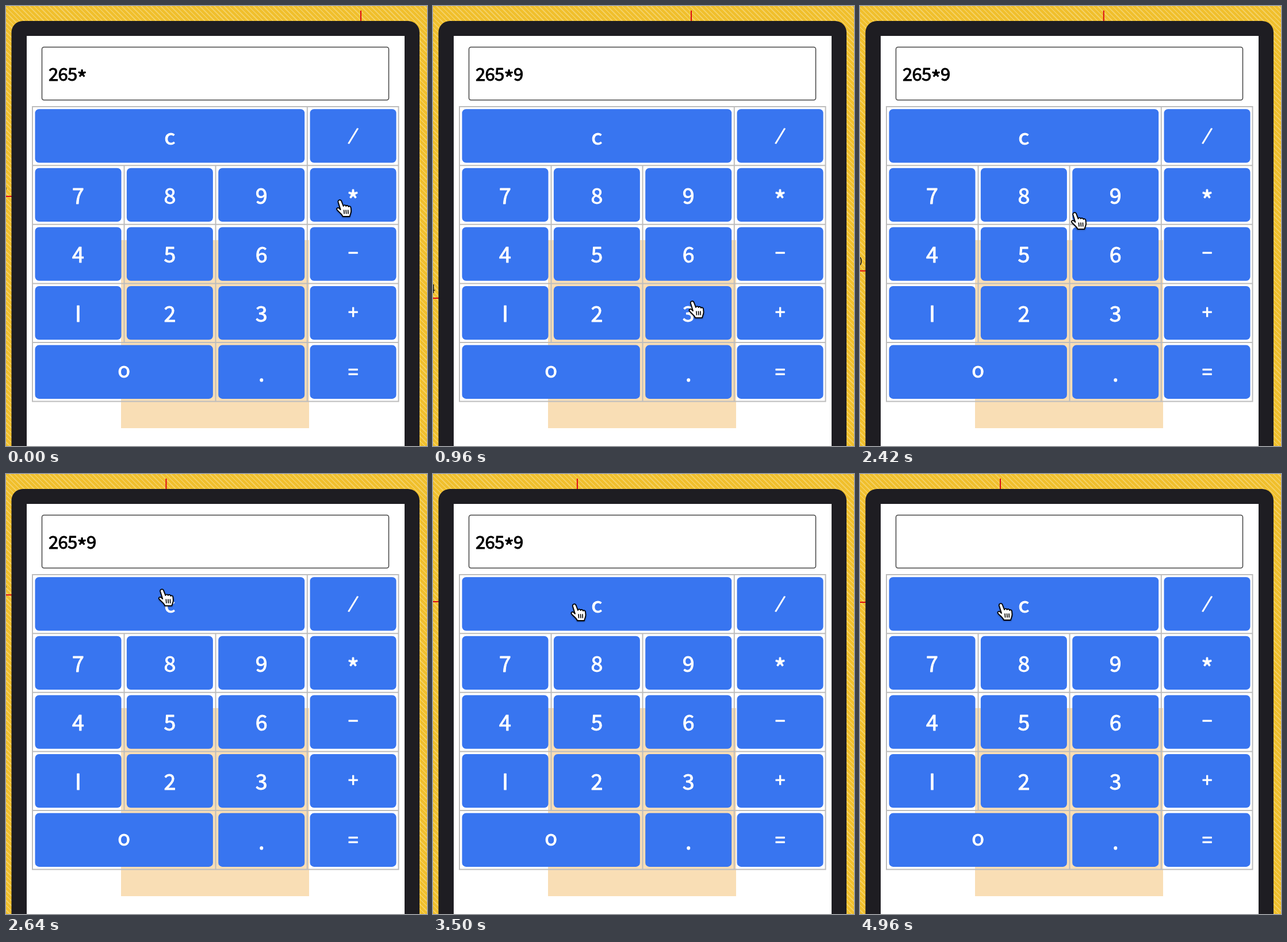
An HTML page that plays this animation: 732 px wide and 765 px high, repeating every 4980 ms.

```html
<!DOCTYPE html>
<html lang="en">
<meta charset="utf-8">
<title>Calculator</title>
<style>
  html, body { margin: 0; width: 100%; height: 100%; overflow: hidden; }
  body { background: repeating-linear-gradient(45deg, #f0bf2c 0 4.2px, #f4d062 4.2px 6px); }
  svg { display: block; }
  text {
    font-family: "Noto Sans CJK JP", "Noto Sans CJK SC", "Noto Sans", sans-serif;
    text-anchor: middle; stroke-linejoin: round;
  }
  #keys text { fill: #fff; stroke: #fff; }
  #keys rect { fill: #3875f0; }
  #display text { stroke: #000; }
</style>
<svg width="732" height="765" viewBox="0 0 732 765">
  <path id="guides" stroke="#dc0a14" stroke-width="2"/>
  <text id="label" x="-12.5" font-size="20" fill="#222"></text>
  <rect x="9.5" y="26" width="709.5" height="800" rx="20" fill="#1e1d22"/>
  <rect x="36" y="52" width="657" height="713" fill="#fff"/>
  <rect x="200" y="407" width="327" height="327" fill="#f9deb5"/>
  <rect x="62.5" y="71.5" width="603" height="92" rx="3.5" fill="#fff" stroke="#444" stroke-width="1.5"/>
  <g id="display"></g>
  <path fill="none" stroke="#bdbdbd" stroke-width="2"
    d="M46 175H682.5V687.5H46ZM46 277.3H682M46 379.8H682M46 482.4H682M46 585H682M205.5 277V585M364.5 277V687M523.8 175V687"/>
  <g id="keys"></g>
  <g id="hand" stroke-linejoin="round" stroke-linecap="round" style="filter: drop-shadow(0 1px 1px #0006)">
    <path fill="#fff" stroke="#000" stroke-width="1.8"
      d="M4 5C3 1 8 0 9.5 3L13 12C13.5 9.5 17 9.5 17.5 12C18.5 10 21.5 10.5 22 13C23 11.5 26 12 26 15L26.5 20C26.5 24 25 25 24 30H12C11 26 6 23 2.5 19C0 16 3 13.5 6 16L8 18Z"/>
    <path fill="none" stroke="#000" stroke-width="1.6" d="M14 19L14.5 25M17.5 19L18 25M21 19L21.3 25"/>
  </g>
</svg>
<script>
const $ = id => document.getElementById(id);
const LOOP = 4980, LAG = 80, NINE_AT = 460, CLEAR_AT = 3800;

// Font size and baseline (from the key's top edge) of signs unlike the digits
const SIGNS = {
  "/": [30, 56], "*": [46, 74], "−": [32, 57], "+": [32, 57],
  "=": [32, 58], "o": [36, 56], ".": [38, 63]
};

const glyph = (char, x, y, size, tilt = 0) =>
  `<text x="${x}" y="${y}" font-size="${size}" transform="rotate(${tilt} ${x} ${y - 9})">${char}</text>`;

function key(char, col, row, span = 1) {
  const x = 50.5 + 159.35 * col, y = 179.2 + 102.6 * row;
  const width = 150 + 159.35 * (span - 1);
  const [size, base] = SIGNS[char] || [37.5, 62];
  return `<rect x="${x}" y="${y}" width="${width}" height="93.3" rx="7"/>` +
    glyph(char, x + width / 2, y + base, size, char === "/" ? 14 : 0);
}

$("keys").innerHTML =
  key("c", 0, 0, 3) + key("/", 3, 0) +
  ["789*", "456−", "I23+"].map((line, r) =>
    [...line].map((char, col) => key(char, col, r + 1)).join("")).join("") +
  key("o", 0, 4, 2) + key(".", 2, 4) + key("=", 3, 4);

// Pointer path: time, x, y
const PATH = [
  [-80, 617, 331], [0, 580, 335], [380, 450, 337], [640, 450, 337],
  [880, 449, 508], [960, 450, 511], [1200, 450, 516], [2180, 450, 516],
  [2340, 424, 461], [2420, 373, 358], [2600, 270, 198], [2860, 277, 203],
  [2940, 279, 210], [3160, 279, 212], [3420, 251, 222], [3500, 245, 224],
  [3580, 244, 223], [5000, 244, 223]
];

function slope(i, axis) {
  if (!PATH[i - 1] || !PATH[i + 1]) return 0;
  const rate = k => (PATH[k + 1][axis] - PATH[k][axis]) / (PATH[k + 1][0] - PATH[k][0]);
  const a = rate(i - 1), b = rate(i);
  return a * b > 0 ? 2 * a * b / (a + b) : 0;
}

// Monotone cubic through the path points
function pointer(t) {
  const i = Math.max(0, PATH.findIndex(p => p[0] > t) - 1);
  const a = PATH[i], b = PATH[i + 1], span = b[0] - a[0], u = (t - a[0]) / span;
  const ease = u * u * (3 - 2 * u);
  return [1, 2].map(axis => a[axis] + (b[axis] - a[axis]) * ease +
    span * u * (1 - u) * ((1 - u) * slope(i, axis) - u * slope(i + 1, axis)));
}

let shown = null;
function display(value) {
  if (value === shown) return;
  shown = value;
  $("display").innerHTML = [...value].map((char, i) =>
    glyph(char, 82.7 + 16.5 * i, char === "*" ? 141 : 130, char === "*" ? 38 : 31)).join("");
}

const start = performance.now();
function draw() {
  const t = (performance.now() - start) % LOOP;
  const [x, y] = pointer(t), [gx, gy] = pointer(t - LAG);
  $("hand").setAttribute("transform", `translate(${x - 6} ${y + 1})`);
  $("guides").setAttribute("d", `M${gx} 8V30M0 ${gy}H14`);
  $("label").setAttribute("y", gy - 9);
  $("label").textContent = String(Math.round(gy / 2)).replace(/1/g, "I");
  display(t >= CLEAR_AT ? "" : t >= NINE_AT ? "265*9" : "265*");
  requestAnimationFrame(draw);
}
draw();
</script>
</html>
```
